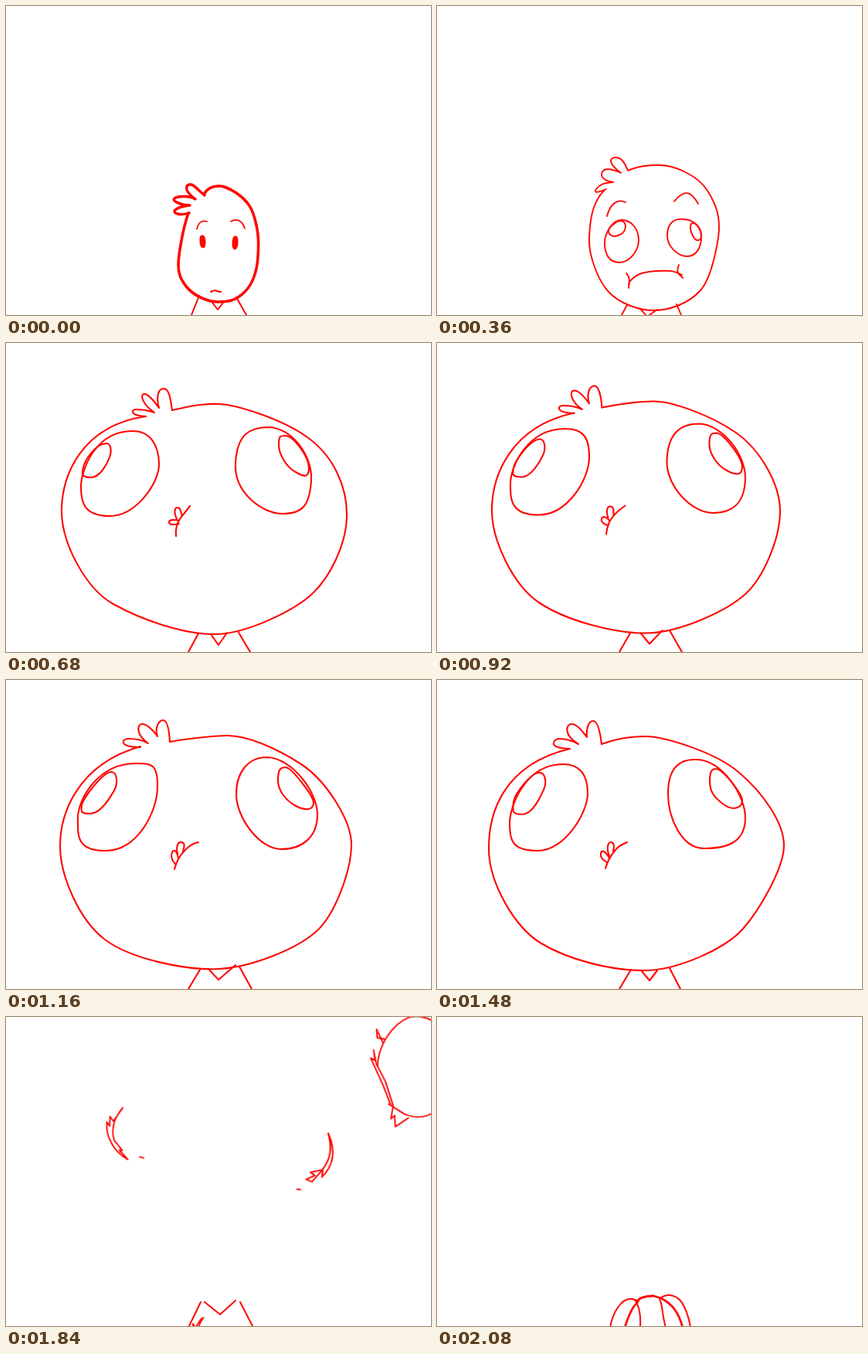
Write an HTML page without scripts that moves like this. It is 550x400 px and loops after 2.2 s.

```html
<!DOCTYPE html>
<html lang="en">
<head>
<meta charset="utf-8">
<title>Puffed up</title>
<style>
html, body { margin: 0; width: 100%; height: 100%; overflow: hidden; background: #fff; }
svg { display: block; width: 100vw; height: 100vh; }
path { fill: none; stroke: #fe0600; stroke-width: 2px; stroke-linecap: round; stroke-linejoin: round; }

/* Each drawn line carries its poses as --a to --f; steps keep the hand-drawn rate. */
.line { animation: pose 2200ms infinite; }
@keyframes pose {
  0%, 5.45% { d: var(--a); stroke-width: var(--w, 2px); animation-timing-function: steps(3); }
  16.36% { d: var(--b); stroke-width: 1.9px; animation-timing-function: steps(4); }
  30.9% { d: var(--c); stroke-width: 2.1px; animation-timing-function: steps(6); }
  52.72% { d: var(--d, var(--c)); stroke-width: 2.1px; animation-timing-function: steps(4); }
  67.27% { d: var(--e, var(--c)); stroke-width: 2.1px; animation-timing-function: steps(3); }
  78.18% { d: var(--f, var(--d, var(--c))); stroke-width: 2px; animation-timing-function: step-end; }
  100% { d: var(--a); stroke-width: var(--w, 2px); }
}

.head { animation: head 2200ms step-end infinite; }
.brows { animation: brows 2200ms step-end infinite; }
.neck { animation: neck 2200ms step-end infinite; }
.boom { visibility: hidden; animation: boom 2200ms step-end infinite; }
.body { visibility: hidden; animation: body 2200ms step-end infinite; }
@keyframes head { 78.18%, 100% { visibility: hidden; } }
@keyframes brows { 23.63%, 100% { visibility: hidden; } }
@keyframes neck { 87.27%, 100% { visibility: hidden; } }
@keyframes boom { 78.18% { visibility: visible; } 87.27%, 100% { visibility: hidden; } }
@keyframes body {
  87.27% { visibility: visible; transform: translateY(14px); }
  90.9% { visibility: visible; transform: translateY(5px); }
  94.54%, 100% { visibility: visible; transform: none; }
}

.boom g { transform-box: fill-box; transform-origin: center; animation: fly 2200ms infinite; }
.boom path { stroke-width: 1.9px; }
@keyframes fly {
  0%, 78.18% { transform: none; animation-timing-function: steps(4); }
  85.45%, 100% { transform: translate(var(--x), var(--y)) rotate(var(--r)); }
}
</style>
</head>
<body>
<svg viewBox="0 0 550 400" role="img" aria-label="A head puffs up, wobbles and bursts">

<g class="neck">
  <path class="line" style="
    --a:path('M250 375L240 400M267 384L274 393L281 384M298 377L311 400');
    --b:path('M246 387L239 400M264 393L272 402L285 393M310 386L316 400');
    --c:path('M249 376L236 400M265 377L275 391L286 375M300 373L316 400');
    --d:path('M251 375L236 400M262 374L275 388L297 369M302 371L318 400');
    --e:path('M251 375L236 400M265 377L275 389L285 376M301 373L315 400');
    --f:path('M252 369L237 400M257 369L277 385L297 367M303 369L319 400')"/>
</g>

<g class="head">
  <!-- outline -->
  <path class="line" style="--w:3.6px;
    --a:path('M256 244C260 236 268 233 276 233S312 245 320 269S327 310 326 325S321 358 309 370S287 383 274 383S243 375 234 364S223 345 223 335S228 291 236 268');
    --b:path('M247 213C262 207 272 206 288 206S336 217 350 239S365 275 365 287S357 350 341 368S300 394 280 394S235 384 222 370S196 324 197 300S201 254 217 238');
    --c:path('M215 87C238 82 255 78 276 79S355 97 390 122S442 188 441 225S419 303 397 324S312 377 270 377S175 358 139 338S71 258 72 215S97 107 181 95');
    --d:path('M212 80C235 76 260 73 285 72S350 88 382 109S448 182 447 215S426 304 401 326S318 372 275 374S161 361 128 336S70 254 70 215S90 110 174 86');
    --e:path('M213 83C232 76 248 73 270 73S358 92 390 119S449 185 449 214S418 297 396 322S312 376 268 376S170 362 135 341S67 262 67 218S84 110 172 89')"/>
  <!-- hair -->
  <path class="line" style="--w:3.4px;
    --a:path('M257 245C250 240 243 230 238 231S229 238 245 250C237 245 222 246 218 249S226 258 238 258C229 259 223 260 219 264S224 272 237 268');
    --b:path('M247 213C242 201 238 196 231 196S220 203 238 216C229 212 222 210 217 212S208 225 228 228C216 229 210 231 206 237S210 241 219 237');
    --c:path('M215 87C213 72 211 59 204 59S194 70 198 84C192 76 185 66 179 66S176 79 192 90C183 87 174 86 168 86S160 94 181 95');
    --d:path('M212 80C211 62 208 52 203 52S192 62 196 73C190 64 182 57 176 57S167 70 184 82C176 77 166 76 158 76S145 87 174 87');
    --e:path('M213 83C211 66 208 53 202 53S193 63 194 74C187 65 181 57 174 57S163 71 183 83C174 78 164 76 158 76S140 88 172 89')"/>
  <!-- left eye and pupil -->
  <path class="line" style="--w:3px;
    --a:path('M254 298C256 298 257 301 257 306S256 312 255 312S252 310 252 305S252 298 254 298');
    --b:path('M240 277C253 278 261 290 261 303S250 332 236 332S217 320 217 307S227 276 240 277');
    --c:path('M165 114C186 114 198 132 198 157S168 224 134 224S97 205 97 186S114 113 165 114');
    --d:path('M168 108C188 108 197 108 196 140S170 220 130 221S93 200 93 178S118 108 168 108');
    --e:path('M163 109C185 109 195 122 195 147S165 221 131 221S94 208 94 186S114 109 163 109')"/>
  <path class="line" style="--w:3px;
    --a:path('M254 299C256 299 256 301 256 303S256 310 255 310S253 307 253 304S253 299 254 299');
    --b:path('M238 278C244 279 245 285 243 290S234 298 229 298S222 294 222 291S231 278 238 278');
    --c:path('M130 130C136 130 137 140 134 148S122 174 110 174S98 170 100 161S116 130 130 130');
    --d:path('M137 119C144 120 145 134 140 143S122 173 109 173S97 170 98 162S126 118 137 119');
    --e:path('M133 120C141 121 142 133 138 142S124 174 110 174S98 168 99 158S122 119 133 120')"/>
  <!-- right eye and pupil -->
  <path class="line" style="--w:3px;
    --a:path('M297 299C299 299 299 303 299 307S297 314 296 314S294 311 294 307S295 299 297 299');
    --b:path('M318 276C332 276 342 286 342 299S336 324 324 324S298 312 298 297S306 275 318 276');
    --c:path('M340 109C370 110 397 146 395 178S384 221 358 221S295 194 297 156S315 109 340 109');
    --d:path('M338 100C370 101 403 145 403 174S384 219 356 219S298 178 298 148S314 100 338 100');
    --e:path('M335 103C368 102 400 150 399 180S376 218 346 218S299 178 299 147S312 102 335 103')"/>
  <path class="line" style="--w:3px;
    --a:path('M297 301C298 301 298 304 298 306S297 312 296 312S295 310 295 307S296 301 297 301');
    --b:path('M332 281C337 282 342 290 342 296S340 304 336 303S328 292 328 287S329 281 332 281');
    --c:path('M361 120C372 120 392 147 392 162S383 172 373 166S353 144 353 132S355 120 361 120');
    --d:path('M362 113C370 114 398 150 398 159S388 170 375 163S352 143 352 130S354 113 362 113');
    --e:path('M361 115C371 116 395 148 395 156S385 171 371 161S353 143 353 131S355 115 361 115')"/>
  <!-- mouth -->
  <path class="line" style="
    --a:path('M265 370C267 368 271 368 273 369S276 370 278 370');
    --b:path('M248 360C252 350 262 344 284 343S306 343 317 348');
    --c:path('M220 250C219 240 222 231 227 225S232 219 238 211');
    --d:path('M218 245C221 233 226 226 231 221S240 212 249 210');
    --e:path('M218 244C221 233 226 226 230 221S237 214 246 210')"/>
  <path class="line" style="
    --a:path('M265 370C265 370 265 370 265 370S266 370 266 370');
    --b:path('M245 346C248 349 249 354 249 357S248 362 248 365');
    --c:path('M224 234C216 236 211 235 211 232S217 228 224 230');
    --d:path('M219 238C214 233 213 227 215 223S221 220 223 231');
    --e:path('M220 236C214 233 211 229 212 224S219 222 223 231')"/>
  <path class="line" style="
    --a:path('M277 370C277 370 277 370 277 370S278 370 278 370');
    --b:path('M313 335C311 340 311 345 313 347S316 350 318 352');
    --c:path('M221 228C217 219 218 213 222 213S226 218 228 224');
    --d:path('M222 225C220 216 222 209 227 210S231 215 229 222');
    --e:path('M223 228C219 218 221 210 225 210S230 215 228 222')"/>
  <g class="brows">
    <path class="line" style="--w:1.7px;
      --a:path('M247 289C248 283 252 276 260 279');
      --b:path('M220 272C224 256 234 249 244 254');
      --c:path('M115 140C122 124 140 112 160 112')"/>
    <path class="line" style="--w:1.7px;
      --a:path('M291 279C298 274 306 278 309 288');
      --b:path('M307 253C319 238 328 238 338 256');
      --c:path('M320 110C345 100 370 108 385 130')"/>
  </g>
</g>

<!-- torn pieces -->
<g class="boom">
  <g style="--x:-90px;--y:-190px;--r:-40deg">
    <path d="M227 72L200 78L155 91L174 84L158 86L163 83L146 92L141 93C140 82 146 75 159 76C164 73 154 64 161 52C170 45 182 52 185 65C192 52 205 43 221 42L222 47L205 57L214 57L202 65"/>
  </g>
  <g style="--x:60px;--y:-200px;--r:50deg">
    <path d="M289 67L294 64L330 65L347 69L361 77L358 80L365 81L361 87L350 82L355 79L341 73L315 68L289 71Z"/>
  </g>
  <g style="--x:-290px;--y:-140px;--r:-35deg">
    <path d="M130 224L104 220C85 210 83 182 89 165C96 142 115 120 135 109C150 100 170 98 182 101C192 105 197 115 197 133L201 118L208 114L216 117L205 123L215 123L204 129L211 131L198 136"/>
    <path d="M211 131C208 150 203 162 196 169L190 170L197 183L188 184C178 200 165 213 150 219L144 224L134 224M104 220L125 227L118 220L130 224"/>
    <path d="M93 157C96 166 108 165 120 158C136 148 146 128 141 113L130 111"/>
  </g>
  <g style="--x:230px;--y:-130px;--r:40deg">
    <path d="M311 182C298 158 300 125 315 106C332 90 358 94 376 104C395 118 410 140 409 175C408 200 395 215 372 218L348 217M302 152L286 141L292 150L301 147"/>
    <path d="M296 166L308 180L330 194L354 216L360 232L362 226L370 238L379 220M296 166L304 177L298 177L330 200L350 216"/>
    <path d="M410 153C408 160 403 163 396 160C380 155 366 135 365 118C366 110 373 107 381 109C392 118 404 136 410 153Z"/>
  </g>
  <g style="--x:-110px;--y:-70px;--r:-70deg">
    <path d="M265 179L244 180L246 173L236 180L238 174C222 184 213 204 216 225L219 209L221 212L225 196C233 184 248 178 265 179Z"/>
    <path d="M228 235L230 240"/>
  </g>
  <g style="--x:120px;--y:-50px;--r:70deg">
    <path d="M289 189C310 194 326 205 329 230L322 223L326 244L319 248L322 236L315 238L322 224C317 205 306 196 289 189Z"/>
    <path d="M325 262L322 265"/>
  </g>
  <g style="--x:-20px;--y:190px;--r:60deg">
    <path d="M248 264C250 282 264 293 287 294L299 292L296 297L316 282L313 292C290 310 262 299 244 279L250 281L247 268Z"/>
  </g>
  <g style="--x:-250px;--y:-20px;--r:-45deg">
    <path d="M84 150C70 177 66 200 70 225L77 239L82 273L72 255L66 243L70 240L61 222L65 220L57 208L63 194L67 215L69 190C71 172 77 160 84 150Z"/>
  </g>
  <g style="--x:-220px;--y:120px;--r:50deg">
    <path d="M85 281C96 302 110 312 130 321L117 311L127 315L123 281C132 305 142 325 161 341L145 333L154 342C125 335 103 318 88 290L92 293Z"/>
  </g>
  <g style="--x:-100px;--y:150px;--r:-30deg">
    <path d="M175 315C190 326 202 337 209 348L205 349C195 345 176 333 175 315ZM215 348C232 356 250 361 270 359L258 346L271 357C283 349 290 337 292 322L295 346L311 345L300 354L309 353L298 361"/>
    <path d="M205 349L192 350L202 354L184 352C192 365 205 370 250 370L285 370"/>
  </g>
  <g style="--x:150px;--y:150px;--r:35deg">
    <path d="M285 370C335 365 385 345 428 301C405 325 385 340 360 348L372 350C345 360 320 366 285 372Z"/>
    <path d="M385 300L381 312L370 328L340 342L334 339L356 335L375 319L364 319L378 310Z"/>
  </g>
  <g style="--x:250px;--y:-30px;--r:60deg">
    <path d="M411 125C430 142 444 166 450 195L444 188L446 208L442 211L443 190L437 184L440 179C432 157 423 144 415 135Z"/>
  </g>
  <g style="--x:230px;--y:90px;--r:-50deg">
    <path d="M438 243C437 268 420 285 398 311L404 297L400 301L407 290L404 289C420 275 430 260 438 243Z"/>
  </g>
</g>

<g class="body">
  <path d="M224 402C227 384 238 363 253 365L261 368M256 366C262 374 264 385 263 402M288 365C292 372 291 385 296 402M290 363C298 358 312 358 320 375C325 386 327 395 328 402"/>
  <path style="stroke-width:2.8px" d="M243 402C248 386 254 374 259 370C259 363 272 361 280 361L290 364C303 371 312 380 318 402"/>
</g>
</svg>
</body>
</html>
```
